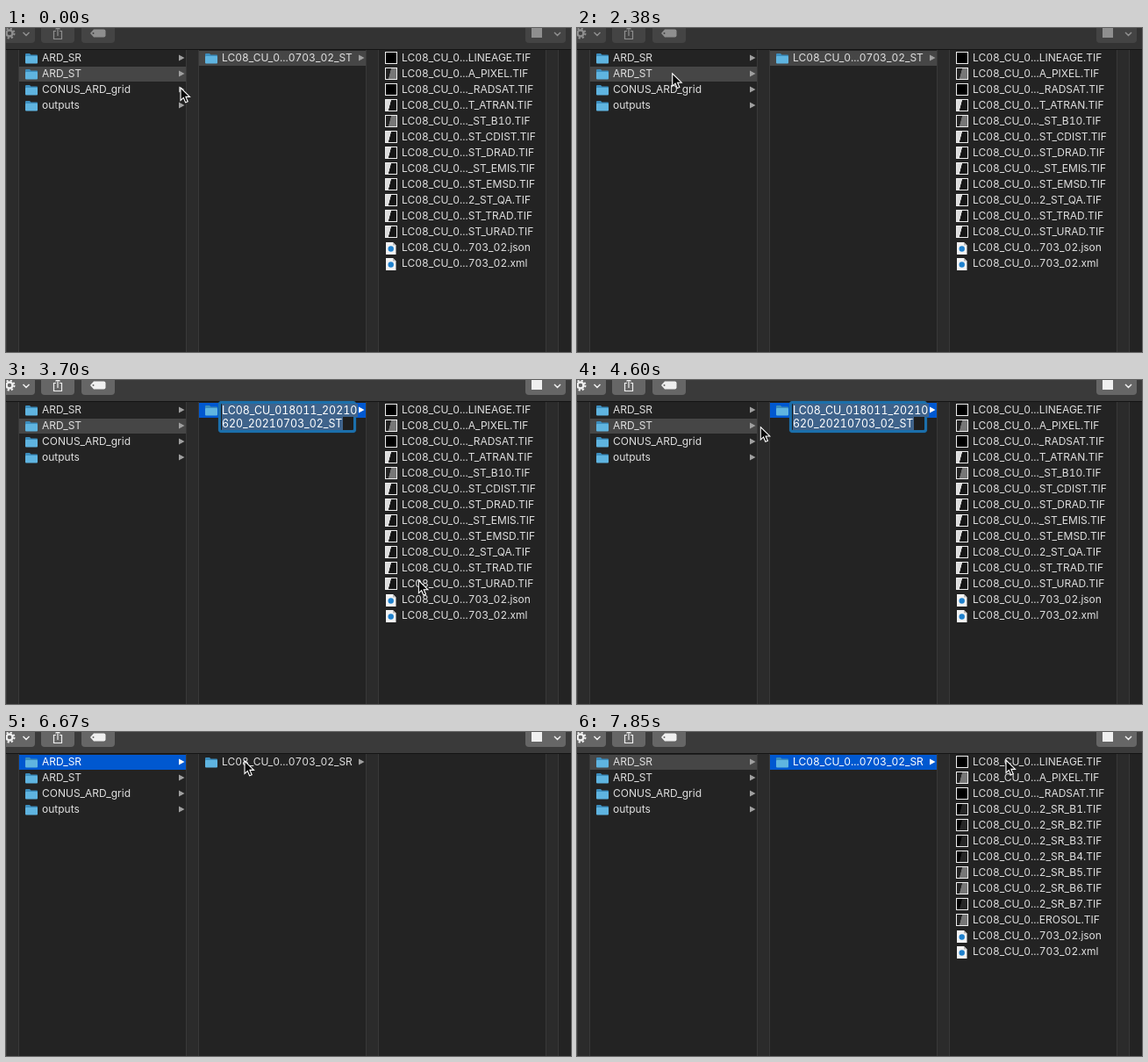
Recreate the animation shown at these times as an HTML page. Size 644x369 px, loop 8000 ms.

```html
<!DOCTYPE html>
<html lang="en">
<head>
<meta charset="utf-8">
<title>Column file browser</title>
<style>
html, body { margin: 0; width: 100%; height: 100%; overflow: hidden; background: #232323; }
#stage {
  position: relative; width: 644px; height: 369px; overflow: hidden; background: #232323;
  font: 12px/16px Inter, "Noto Sans", sans-serif; font-variant-numeric: tabular-nums; color: #e0e0e0;
}
:where(#stage *) { position: absolute; left: 0; top: 0; box-sizing: border-box; }
#bar { width: 644px; height: 25px; background: #333; border-bottom: 1px solid #141414; --btn: #444; --ink: #8f8f8f; }
.active #bar { background: #3a3a3a; --btn: #666; --ink: #f0f0f0; }
.gutter { top: 25px; width: 15px; height: 344px; background: #2b2b2b; border: solid #393939; border-width: 0 1px; }
.row { width: 190px; height: 17px; }
.row span { left: 26px; white-space: pre; }
.row svg { left: 6px; top: 1px; }
.row .more { left: 181px; top: 4px; fill: #a0a0a0; }
.dim { background: #464646; }
.lit { background: #0058d0; color: #fff; }
.lit .more { fill: #fff; }
.thumb { left: 7px; top: 1px; width: 14px; height: 14px; border: 1px solid #eee; }
#field {
  left: 242px; top: 24px; width: 157px; height: 36px; background: #1e1e1e; color: #fff;
  border: 3px solid #1b6fab; border-radius: 4px; box-shadow: 0 0 1px #1b6fab;
}
#field span { left: 1px; height: 15px; font-size: 12.4px; line-height: 15px; padding-right: 1px; background: #3f638b; white-space: pre; }
#field span + span { top: 15px; }
[hidden] { display: none; }
</style>
</head>
<body>
<div id="stage">
  <div id="bar">
    <svg width="644" height="24" fill="var(--btn)">
      <rect x="-8" y="-8" width="41" height="25" rx="4"/>
      <rect x="40" y="-8" width="38" height="25" rx="4"/>
      <rect x="86" y="-8" width="38" height="25" rx="4"/>
      <rect x="592" y="-8" width="46" height="25" rx="4"/>
      <g fill="none" stroke="var(--ink)" stroke-width="1.5">
        <circle cx="4" cy="6" r="3.5" stroke-width="2.5"/>
        <circle cx="4" cy="6" r="5.5" stroke-width="2" stroke-dasharray="2.2 2.12"/>
        <path d="M19.5 5l3.5 3.5L26.5 5M625 5l3.5 3.5L632 5"/>
        <path stroke-width="1.2" d="M57 3.5H54.5V12.5H63.500V3.5H61M59 9V-1M56.5 1.5L59-1l2.5 2.5"/>
      </g>
      <path fill="var(--ink)" d="M96 6l4-4.5h11.5q2 0 2 2v5q0 2-2 2H100z"/>
      <circle cx="99.5" cy="6" r="1"/>
      <rect x="599" y="0" width="12" height="11" fill="var(--ink)"/>
    </svg>
  </div>
  <div id="browser"></div>
  <div id="field"><span>LC08_CU_018011_20210</span><span>620_20210703_02_ST</span></div>
  <svg id="arrow" width="14" height="20" viewBox="-1 -1 14 20">
    <path d="M0 0V14.5L3.3 11.4L5.6 16.8L8.2 15.7L5.9 10.4H10.5Z" fill="#080808" stroke="#fff" stroke-width="1.1"/>
  </svg>
  <svg id="beam" width="10" height="18" viewBox="-5 -9 10 18" fill="none">
    <defs><path id="stem" d="M-3-7.5Q0-7.5 0-5V5Q0 7.5-3 7.5M3-7.5Q0-7.5 0-5M0 5Q0 7.5 3 7.5M-2 2H2"/></defs>
    <use href="#stem" stroke="#fff" stroke-width="2.6"/>
    <use href="#stem" stroke="#111"/>
  </svg>
</div>
<script>
const $ = id => document.getElementById(id);
const folder = `<svg width="16" height="15"><path d="M1 3q0-1 1-1h4l1.5 1.5H14q1 0 1 1V6H1z" fill="#3c8dbd"/>
  <rect x="1" y="5" width="14" height="8.5" rx="1" fill="#5fb4e0"/></svg>`;
const more = '<svg class="more" width="8" height="8"><path d="M1 .5L7.5 4L1 7.5z"/></svg>';
const page = `<svg width="16" height="16"><path d="M2 1h8l3.5 3.5V15H2z" fill="#f2f2f2"/>
  <path d="M10 1v3.5h3.5z" fill="#bbb"/><circle cx="7.7" cy="8.5" r="3.2" fill="#1f80cc"/></svg>`;

const row = (x, i, name, icon, tail = '') =>
  `<div class="row" style="left:${x}px;top:${26 + 18 * i}px">${icon}<span>${name}</span>${tail}</div>`;

// Shades on both sides of the slanted edge, by kind of image.
function shades(name) {
  if (/LINEAGE|RADSAT/.test(name)) return ['#000', '#000'];
  if (/PIXEL|B10|EROSOL|B[56]/.test(name)) return ['#222', '#777'];
  return /SR_B/.test(name) ? ['#000', '#262626'] : ['#ddd', '#161616'];
}
function thumb(name) {
  const [left, right] = shades(name);
  return `<div class="thumb" style="background:linear-gradient(105deg,${left} 38%,${right} 42%)"></div>`;
}

const shared = 'LINEAGE A_PIXEL _RADSAT ';
const images = {
  ST: shared + 'T_ATRAN _ST_B10 ST_CDIST ST_DRAD _ST_EMIS ST_EMSD 2_ST_QA ST_TRAD ST_URAD',
  SR: shared + '2_SR_B1 2_SR_B2 2_SR_B3 2_SR_B4 2_SR_B5 2_SR_B6 2_SR_B7 EROSOL'
};
function files(kind) {
  const rows = images[kind].split(' ').map((end, i) => row(425, i, `LC08_CU_0...${end}.TIF`, thumb(end)));
  for (const ext of ['json', 'xml']) rows.push(row(425, rows.length, `LC08_CU_0...703_02.${ext}`, page));
  return `<div id="files${kind}">${rows.join('')}</div>`;
}

$('browser').innerHTML =
  [0, 205, 410, 615].map(x => `<div class="gutter" style="left:${x}px"></div>`).join('') +
  ['ARD_SR', 'ARD_ST', 'CONUS_ARD_grid', 'outputs'].map((name, i) => row(15, i, name, folder, more)).join('') +
  row(220, 0, '', folder, more) + files('ST') + files('SR');

const [rowSR, rowST, , , sub] = document.querySelectorAll('.row');
const subName = sub.querySelector('span');

// Pointer moves: first and last tick, end point, and a bend point for curved ones.
const home = [199, 68];
const moves = [
  { from: 8, to: 13, end: [77, 54], bend: [115, 90] },
  { from: 15, to: 19, end: [280, 40] },
  { from: 20, to: 23, end: [476, 214] },
  { from: 23, to: 28, end: [470, 52], bend: [446, 300] },
  { from: 29, to: 32, end: [118, 52], bend: [294, 56] },
  { from: 32, to: 37, end: [80, 32] },
  { from: 40, to: 45, end: [272, 33] },
  { from: 48, to: 53, end: [489, 32], bend: [380, 180] }
];
const TICK = 148.1, LOOP = 8000, TICKS = 54;
const ease = u => u * u * (3 - 2 * u);

function pointer(n) {
  let at = home;
  for (const { from, to, end, bend } of moves) {
    if (n <= from) break;
    const u = ease(Math.min(1, (n - from) / (to - from))), v = 1 - u;
    at = at.map((a, i) => {
      const b = bend ? bend[i] : (a + end[i]) / 2;
      return v * v * a + 2 * u * v * b + u * u * end[i];
    });
  }
  return at;
}

const mark = (el, state) => { el.className = 'row ' + state; };
function place(el, x, y, shown) {
  el.style.transform = `translate(${x}px,${y}px)`;
  el.style.display = shown ? '' : 'none';
}

function draw(n) {
  const active = n >= 18, leaving = n >= 37, picked = n >= 38, opened = n >= 46;
  const editing = n >= 19 && !picked;
  $('stage').className = active ? 'active' : '';
  mark(rowSR, opened ? 'dim' : picked ? 'lit' : '');
  mark(rowST, picked ? '' : leaving ? 'lit' : 'dim');
  mark(sub, opened || (active && !leaving) ? 'lit' : picked ? '' : 'dim');
  subName.textContent = 'LC08_CU_0...0703_02_' + (picked ? 'SR' : 'ST');
  $('field').hidden = !editing;
  $('filesST').hidden = picked;
  $('filesSR').hidden = n < 47;

  const [x, y] = pointer(n);
  const overText = editing && n <= 20;
  place($('arrow'), x - 1, y - 1, !overText);
  place($('beam'), x - 5, y - 9, overText);
}

let last = -1;
const start = performance.now();
function loop() {
  const n = Math.min(TICKS - 1, Math.floor(((performance.now() - start) % LOOP) / TICK));
  if (n !== last) draw(last = n);
  requestAnimationFrame(loop);
}
loop();
</script>
</body>
</html>
```
